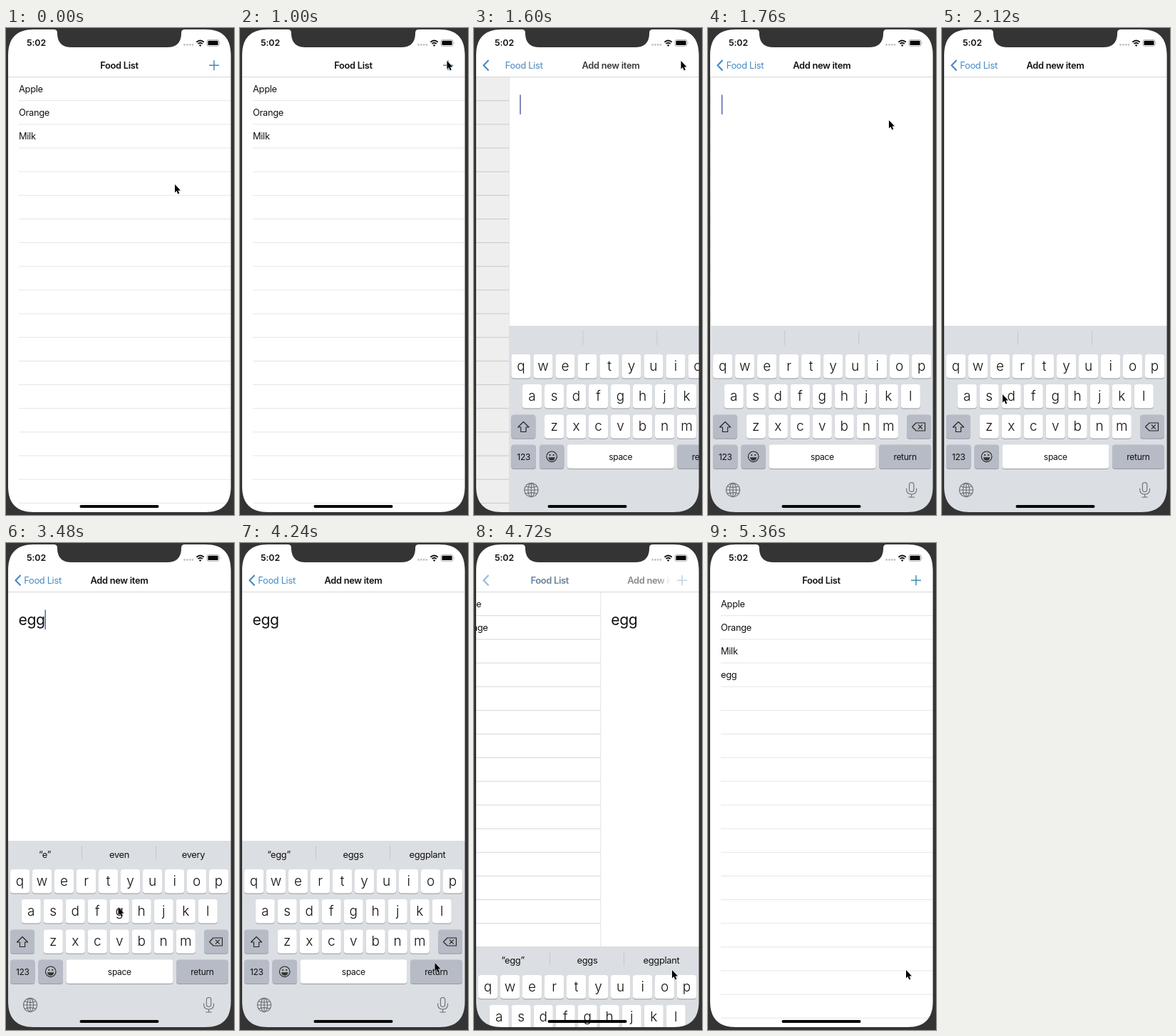
Animation of 320x682 px, one loop 5600 ms. Source, as an HTML page:

```html
<!DOCTYPE html>
<html lang="en">
<head>
<meta charset="utf-8">
<title>Food List</title>
<style>
  html, body { margin: 0; width: 100%; height: 100%; overflow: hidden; background: #fff; }
  svg { display: block; width: 320px; height: 682px; }
  text { font: 400 12.85px Inter, "Liberation Sans", sans-serif; letter-spacing: -.3px; fill: #111; }
  .mid { text-anchor: middle; }
  .bold { font-weight: 600; }
  .big { font-size: 21.2px; letter-spacing: -.4px; }
  .letter { font-size: 19px; font-weight: 300; letter-spacing: 0; }
  .small { font-size: 12px; }
  .blue { fill: #4489c8; }
  .icon { fill: none; stroke: #222; stroke-width: 1.1; stroke-linejoin: round; stroke-linecap: round; }
  .soft { stroke: #6a6e75; }
</style>
</head>
<body>
<svg id="stage" viewBox="0 0 320 682">
  <defs>
    <linearGradient id="fade" gradientUnits="userSpaceOnUse" x1="258" x2="276" y1="0" y2="0">
      <stop stop-color="#fff"/><stop offset="1" stop-color="#000"/>
    </linearGradient>
    <mask id="titleMask" maskUnits="userSpaceOnUse" x="0" y="30" width="320" height="40">
      <rect y="30" width="320" height="40" fill="url(#fade)"/>
    </mask>
  </defs>
  <rect width="320" height="682" fill="#fff"/>

  <g id="list">
    <path id="lines" fill="none"/>
    <g id="rows"></g>
  </g>
  <rect id="dim" y="68" width="320" height="614" opacity="0"/>

  <g id="detail">
    <rect x="3" y="68" width="320" height="614" fill="#fff"/>
    <path id="edge" d="M3 69V682" stroke="#e4e4e4"/>
    <text id="typed" class="big" x="17.5" y="115"></text>
    <rect id="caret" y="93.5" width="1.6" height="27.5" fill="#5b6fae"/>
  </g>

  <g id="keyboard"></g>

  <g id="nav">
    <rect width="320" height="68.5" fill="#fff"/>
    <path d="M0 68.7H320" stroke="#d4d4d6"/>
    <path id="chevron" d="M20.5 45L13.5 52.3L20.5 59.6" fill="none" stroke="#4489c8" stroke-width="2.1"/>
    <g id="rootTitle">
      <text id="rootBold" class="mid bold" y="56.6">Food List</text>
      <text id="rootBlue" class="mid blue" y="56.6">Food List</text>
    </g>
    <g mask="url(#titleMask)">
      <text id="newTitle" class="mid bold" y="56.6">Add new item</text>
    </g>
    <path id="plus" d="M285 52.3H299M292 45.3V59.3" stroke="#4489b8" stroke-width="1.5"/>
  </g>

  <g id="status">
    <text class="bold" x="29" y="25.4" style="font-size:12.4px;letter-spacing:-.1px">5:02</text>
    <g fill="#c4c4c4">
      <circle cx="250.5" cy="23.5" r="1.4"/><circle cx="254.3" cy="23.5" r="1.4"/>
      <circle cx="258.1" cy="23.5" r="1.4"/><circle cx="261.9" cy="23.5" r="1.4"/>
    </g>
    <g fill="none" stroke="#111" stroke-width="1.8">
      <path d="M267.4 19.7Q272.6 15.2 277.8 19.7"/><path d="M269.4 22.1Q272.6 19.4 275.8 22.1"/>
    </g>
    <path d="M270.8 23.9Q272.6 22.5 274.4 23.9L272.6 25.9Z" fill="#111"/>
    <rect x="282" y="16.4" width="17" height="9" rx="2.4" fill="none" stroke="#a5a5a5" stroke-width=".9"/>
    <rect x="283.4" y="17.7" width="14.2" height="6.4" rx="1.2" fill="#080808"/>
    <path d="M300.5 19.4Q301.7 20.9 300.5 22.4" fill="#a5a5a5"/>
  </g>

  <path fill="#343434" fill-rule="evenodd" d="M0 0H320V682H0Z
    M3 38C3 14 15 2 39 2H67Q72 2 72 7V9Q73 27 92 27H226Q245 27 246 9V7Q246 2 251 2H280C304 2 315.6 14 315.6 38
    V642C315.6 666 304 678 280 678H39C15 678 3 666 3 642Z"/>
  <rect x="103.5" y="668" width="111" height="3.9" rx="1.95" fill="#050505"/>
  <path id="pointer" d="M0 0V11.4L2.5 9.1L4.3 13.4L6.3 12.5L4.5 8.4H8Z" fill="#000"
    stroke="#fff" stroke-width=".9" paint-order="stroke"/>
</svg>
<script>
const LOOP = 5600, WIDTH = 313, ROW = 33.15, TOP = 68.6;
const el = id => document.getElementById(id);
const set = (id, attrs) => {
  for (const k in attrs) el(id).setAttribute(k, attrs[k]);
};
const move = (id, x, y = 0) => set(id, { transform: `translate(${x} ${y})` });
const label = (s, x, y, cls, id = '') => `<text ${id && `id="${id}"`} class="${cls}" x="${x}" y="${y}">${s}</text>`;

// List rows
el('rows').innerHTML = ['Apple', 'Orange', 'Milk', 'egg'].map((s, i) =>
  label(s, 18, TOP + ROW * (i + .5) + 4.8, '', 'row' + i)).join('');
set('lines', { d: Array.from({ length: 18 }, (_, i) => `M18 ${TOP + ROW * (i + 1)}H420`).join('') });

// Keyboard
const key = (x, y, w, fill = '#fff') =>
  `<rect x="${x}" y="${y + 1}" width="${w}" height="33.4" rx="4" fill="#96999e"/>` +
  `<rect x="${x}" y="${y}" width="${w}" height="33.4" rx="4" fill="${fill}"/>`;
const letters = (s, x, y) => [...s].map((c, i) =>
  key(x + i * 31 - 13.6, y, 27.2) + label(c, x + i * 31, y + 23, 'mid letter')).join('');
const GRAY = '#b6bbc5';

el('keyboard').innerHTML = `
  <rect x="3" y="417" width="330" height="270" fill="#dbdee2"/>
  <path d="M106.5 424V444M210.5 424V444" stroke="#c5c8cd"/>` +
  [54.5, 159, 263].map((x, i) => label('', x, 440.8, 'mid', 'hint' + i)).join('') +
  letters('qwertyuiop', 19.6, 457) + letters('asdfghjkl', 35.2, 499) + letters('zxcvbnm', 66.2, 541.4) +
  key(6, 541.4, 34, GRAY) + key(278, 541.4, 34, GRAY) +
  key(6, 583.6, 34.5, GRAY) + key(45.5, 583.6, 34.5, GRAY) + key(84.5, 583.6, 150, '#fff') + key(239, 583.6, 73, GRAY) +
  label('123', 23.3, 604.6, 'mid small') + label('space', 159.3, 604.6, 'mid small') + label('return', 275.5, 604.6, 'mid small') + `
  <path class="icon" d="M23 551.5L30.6 559H26.6V565.5H19.4V559H15.4Z"/>
  <path class="icon" d="M285.5 558.5L291 553H303.5V564H291ZM294.3 555.9L299.5 561.1M299.5 555.9L294.3 561.1"/>
  <circle class="icon" cx="62.7" cy="600.3" r="7.3"/>
  <path d="M58 601.3H67.4Q66.8 605.8 62.7 605.8Q58.6 605.8 58 601.3Z" fill="#333"/>
  <circle cx="60.2" cy="598" r="1.1" fill="#222"/><circle cx="65.2" cy="598" r="1.1" fill="#222"/>
  <g class="icon soft">
    <circle cx="34" cy="647" r="9.6"/><ellipse cx="34" cy="647" rx="4.6" ry="9.6"/>
    <path d="M34 637.4V656.6M24.4 647H43.6M26.3 641.7Q34 645 41.7 641.7M26.3 652.3Q34 649 41.7 652.3"/>
    <rect x="281.4" y="636.5" width="6.4" height="13" rx="3.2"/>
    <path d="M277.6 645V646.5Q278 653 284.6 653Q291.2 653 291.6 646.5V645M284.6 653V657M280.8 657H288.4"/>
  </g>`;

// Pointer stops: time, x, y
const PATH = [
  [0, 237, 219], [40, 237, 219], [600, 289.5, 48], [640, 289.5, 48], [840, 290.5, 46], [1640, 290.5, 46],
  [2090, 85, 513], [2200, 85, 513], [2540, 81, 472], [2780, 81, 472], [3220, 157.5, 510], [3560, 157.5, 510],
  [4200, 273.5, 588], [4300, 273.5, 588], [4480, 278, 598], [LOOP, 278, 598]
];
const HINTS = [
  [0, '', '', ''], [2760, '“e”', 'even', 'every'], [3640, '“egg”', 'eggs', 'eggplant']
];
// Typed text: time, letters, caret x
const TYPING = [[1480, 0, 17.8], [2640, 1, 29.4], [3320, 2, 41.9], [3440, 3, 54.4]];
const PUSH = 1480, POP = 4617, PRESS = 1000;

const clamp = v => Math.min(1, Math.max(0, v));
const smooth = v => v * v * (3 - 2 * v);
const last = (table, t) => table.filter(r => r[0] <= t).pop() || table[0];

// Critically damped spring from 0 to 1
function spring(ms, speed) {
  const x = Math.max(0, ms) / 1000 * speed;
  const v = 1 - (1 + x) * Math.exp(-x);
  return v > .998 ? 1 : v;
}

function pointerAt(t) {
  const i = PATH.findIndex(k => k[0] > t);
  const [t0, x0, y0] = PATH[i - 1], [t1, x1, y1] = PATH[i];
  const f = smooth((t - t0) / (t1 - t0));
  return [x0 + (x1 - x0) * f, y0 + (y1 - y0) * f];
}

function draw(t) {
  const popping = t >= POP;
  const done = popping ? spring(t - POP, 18) : spring(t - PUSH, 28);
  const lag = done - .2 * done * (1 - done);
  const page = popping ? 1 - done : done;
  const bar = popping ? 1 - lag : lag;
  const moving = page > 0 && page < 1;

  move('list', -94 * page);
  set('lines', { stroke: moving ? '#d6d6d8' : '#e5e5e7' });
  set('row3', { opacity: popping ? 1 : 0 });
  set('dim', { opacity: popping ? 0 : .08 * page });
  move('detail', WIDTH * (1 - page));
  set('detail', { visibility: page ? 'visible' : 'hidden' });
  set('edge', { opacity: moving ? 1 : 0 });
  set('keyboard', { visibility: page ? 'visible' : 'hidden' });
  move('keyboard', popping ? 0 : WIDTH * (1 - page), popping ? 265 * (1 - page) : 0);

  move('rootTitle', 159 - 107.5 * bar);
  set('rootBold', { opacity: 1 - bar });
  set('rootBlue', { opacity: bar });
  set('newTitle', { x: 159 + 190 * (1 - bar), opacity: bar });
  set('chevron', { opacity: clamp(1.2 * bar) });
  const pressed = popping ? 0 : clamp((t - PRESS) / 80);
  set('plus', { opacity: clamp(1 - 1.3 * bar) * (1 - .7 * pressed) });

  const [since, count, caretX] = last(TYPING, t);
  el('typed').textContent = 'egg'.slice(0, count);
  set('caret', { x: caretX, opacity: !popping && (t - since) % 1000 < 550 ? 1 : 0 });
  last(HINTS, t).slice(1).forEach((s, i) => { el('hint' + i).textContent = s; });

  move('pointer', ...pointerAt(t));
}

function tick() {
  draw(performance.now() % LOOP);
  requestAnimationFrame(tick);
}
tick();
</script>
</body>
</html>
```
